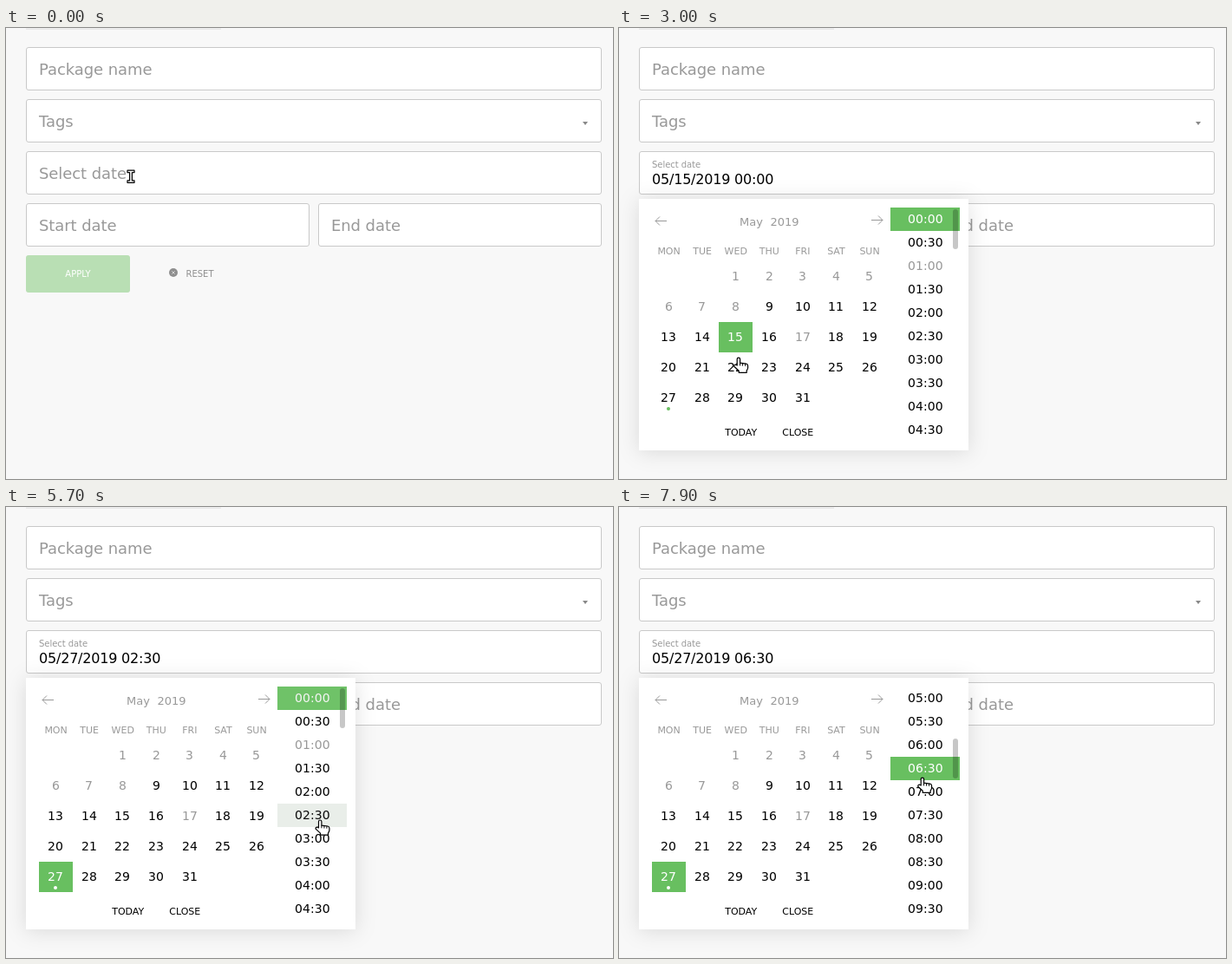
Recreate the animation shown at these times as an HTML page. Size 700x520 px, loop 8 s.

```html
<!DOCTYPE html>
<html lang="en">
<head>
<meta charset="utf-8">
<title>Date filter</title>
<style>
html, body { margin: 0; width: 100%; height: 100%; overflow: hidden; background: #f8f8f8; }
svg { display: block; width: 700px; height: 520px; font-family: "DejaVu Sans", sans-serif; }
.field rect { fill: #fff; stroke: #c9c9c9; }
.hint { font-size: 18px; letter-spacing: -.08px; fill: #999; }
.small { font-size: 10px; }
.mid { text-anchor: middle; }
.cells { font-size: 14px; letter-spacing: .09px; }
.line { fill: none; stroke: #999; }
#value { font-size: 16px; letter-spacing: -.2px; }
#popup { filter: drop-shadow(0 2px 12px rgba(0, 0, 0, .12)); }
#cursor path { fill: #fff; stroke: #000; stroke-width: 1.2; stroke-linejoin: round; }
</style>
</head>
<body>
<svg id="stage" viewBox="0 0 700 520" xmlns="http://www.w3.org/2000/svg">
  <defs><clipPath id="list"><rect x="313" y="207" width="80" height="270"/></clipPath></defs>
  <rect width="700" height="520" fill="#f8f8f8"/>
  <rect x="23" y="0.6" width="225" height="1" fill="#dedede"/>
  <g class="field">
    <rect x="23.5" y="22.5" width="663" height="49" rx="2.5"/>
    <rect x="23.5" y="82.5" width="663" height="49" rx="2.5"/>
    <rect id="dateBox" x="23.5" y="142.5" width="663" height="49" rx="2.5"/>
    <rect x="23.5" y="202.5" width="326" height="49" rx="2.5"/>
    <rect x="360.5" y="202.5" width="326" height="49" rx="2.5"/>
  </g>
  <g class="hint">
    <text x="38" y="54">Package name</text>
    <text x="38" y="114">Tags</text>
    <text id="label">Select date</text>
    <text x="38" y="234">Start date</text>
    <text x="375" y="234">End date</text>
  </g>
  <text id="value" x="38" y="180"></text>
  <path d="M665 108h6l-3 4z" fill="#888"/>
  <rect x="23" y="262" width="120" height="43" rx="3" fill="#b9dfb4"/>
  <text class="small mid" x="83" y="287" fill="#fff">APPLY</text>
  <circle cx="193" cy="282" r="5" fill="#8f8f8f"/>
  <path d="M191.3 280.3l3.4 3.4m0-3.4l-3.4 3.4" stroke="#d8d8d8" stroke-width=".9"/>
  <text class="small" x="207.5" y="287" fill="#8f8f8f">RESET</text>
  <g id="popup">
    <rect x="23" y="197" width="380" height="290" fill="#fff"/>
    <path class="line" d="M55 222.5H42m5-5l-5 5l5 5M291 221.5h13m-5-5l5 5l-5 5"/>
    <g font-size="13" fill="#999">
      <text x="139" y="228">May</text>
      <text x="174.5" y="228">2019</text>
    </g>
    <g id="names" class="mid" font-size="11" fill="#999"></g>
    <g id="days" class="cells"></g>
    <circle id="dot" cx="57" cy="439" r="2"/>
    <g class="mid" font-size="11">
      <text x="140.7" y="470">TODAY</text>
      <text x="206.3" y="470">CLOSE</text>
    </g>
    <g clip-path="url(#list)"><g id="times" class="cells"></g></g>
    <rect id="thumb" x="385" width="6" height="46" rx="3" fill-opacity=".22"/>
  </g>
  <g id="cursor">
    <g id="beam">
      <path d="M-4-6.8H4V-4.4H1.4V4.9H4V7.3H-4V4.9H-1.4V-4.4H-4Z"/>
    </g>
    <g id="arrow"><path d="M.5.5V17.2L4.2 13.7L6.8 20.2L9.6 19.1L6.9 12.7H12Z"/></g>
    <g id="hand">
      <path d="M-1.8 8V.8a1.7 1.7 0 0 1 3.4 0V5.2L8.6 6.1Q10.6 6.6 10.6 8.4V11Q10.2 13 9.2 14V16.3H.2V14.2L-5.2 9.2Q-5.4 7-3.2 7.2Z"/>
      <path d="M1.6 5V8.4M4.6 5.6V8.6M7.6 6V8.8" style="fill:none;stroke-width:1"/>
    </g>
  </g>
</svg>
<script>
const LOOP = 8000, TICK = 100, FADE = 300;
const WHITE = [255, 255, 255], BLACK = [0, 0, 0], GRAY = [153, 153, 153];
const HOVER = [240, 240, 240], GREEN = [104, 191, 96];
const BORDER = [201, 201, 201], BLUE = [60, 156, 220];
const COL = 270 / 7, ROW = 35, SLOT = 27;

// Moments of each user action
const OPEN = 760, PICK = 2560, REPICK = 4560, TIME_A = 5660, TIME_B = 7560;

// Pointer stops: time, x, y; the pointer eases from one to the next
const stops = [
  [0, 144, 171], [100, 142, 171], [1200, 142, 171], [1500, 140, 245], [1900, 212, 337],
  [2200, 164, 363], [2500, 140, 360], [2800, 140, 360], [3000, 138, 381], [3400, 96, 397],
  [3900, 168, 430], [4100, 149, 446], [4500, 58, 429], [5000, 389, 457], [5400, 363, 360],
  [6700, 358, 374], [6800, 354, 335], [7100, 328, 298], [7400, 350, 313], [LOOP, 350, 313]
];

const $ = id => document.getElementById(id);

function add(parent, tag, attrs, text) {
  const el = document.createElementNS("http://www.w3.org/2000/svg", tag);
  for (const k in attrs) el.setAttribute(k, attrs[k]);
  if (text) el.textContent = text;
  return parent.appendChild(el);
}

const blend = (a, b, k) => a.map((v, i) => v + (b[i] - v) * k);
const mix = (a, b, k) => `rgb(${blend(a, b, k).map(Math.round)})`;

function ramp(t, start, span = FADE) {
  const k = Math.min(1, Math.max(0, (t - start) / span));
  return k * k * (3 - 2 * k);
}

const colX = i => Math.round(38 + COL * i);

"MON TUE WED THU FRI SAT SUN".split(" ").forEach((name, i) =>
  add($("names"), "text", { x: 38.3 + COL * (i + .5), y: 261 }, name));

function makeCell(parent, x, y, width, height, textX, base, text, off) {
  const box = add(parent, "rect", { x, y, width, height, fill: "none" });
  const label = add(parent, "text", { x: textX, y: base }, text);
  return { box, label, off };
}

const days = [];
for (let d = 1; d <= 31; d++) {
  const col = (d + 1) % 7, x = colX(col), y = 269 + ROW * Math.floor((d + 1) / 7);
  const textX = Math.round(38 + COL * (col + .5) - 4.5 * String(d).length);
  days[d] = makeCell($("days"), x, y, colX(col + 1) - x, ROW, textX, y + 22, d, d < 9 || d === 17);
}

const times = Array.from({ length: 48 }, (_, i) => {
  const text = String(i >> 1).padStart(2, "0") + (i % 2 ? ":30" : ":00");
  const y = 207 + SLOT * i;
  return makeCell($("times"), 313, y, 80, SLOT, 333, y + 18, text, i === 2);
});

function paint(cell, picked, hovered) {
  const rest = hovered && !cell.off ? HOVER : WHITE;
  cell.box.setAttribute("fill", rest === WHITE && !picked ? "none" : mix(rest, GREEN, picked));
  cell.label.setAttribute("fill", mix(cell.off ? GRAY : BLACK, WHITE, picked));
}

function pointer(t) {
  const n = Math.max(1, stops.findIndex(p => p[0] >= t));
  const [a, b] = [stops[n - 1], stops[n]];
  return blend(a, b, ramp(t, a[0], b[0] - a[0])).slice(1);
}

const scrollAt = t => 270 * ramp(t, 5940, 720);

// What lies under the pointer at a given time
function target(t) {
  const [x, y] = pointer(t);
  if (y < 192) return { shape: "beam" };
  if (x >= 313 && x < 393 && y >= 207 && y < 477) {
    const slot = Math.floor((y - 207 + scrollAt(t)) / SLOT);
    return { slot, shape: times[slot].off ? "arrow" : "hand" };
  }
  if (x >= 38 && x < 308 && y >= 269 && y < 444) {
    const day = Math.floor((y - 269) / ROW) * 7 + Math.floor((x - 38) / COL) - 1;
    return { day, shape: days[day] && !days[day].off ? "hand" : "arrow" };
  }
  return { shape: "arrow" };
}

function draw(t) {
  const shown = ramp(t, OPEN), pick = ramp(t, PICK), again = ramp(t, REPICK);
  const early = ramp(t, TIME_A), late = ramp(t, TIME_B);

  $("dateBox").style.stroke = mix(BORDER, BLUE, shown - pick);
  $("label").setAttribute("transform",
    `translate(38 ${174 - 13 * pick}) scale(${1 - 8 / 18 * pick})`);
  const date = t < REPICK ? "05/15/2019" : "05/27/2019";
  const time = t < TIME_A ? "00:00" : t < TIME_B ? "02:30" : "06:30";
  $("value").textContent = t < PICK ? "" : `${date} ${time}`;

  $("popup").setAttribute("opacity", shown);
  $("popup").setAttribute("transform", `translate(0 ${-8 * (1 - shown)})`);

  // Hover follows the pointer one tick late
  const over = target(Math.max(0, t - TICK));
  const today = 1 - pick + again;
  const dayPick = { 15: pick - again, 27: today };
  days.forEach((cell, d) => paint(cell, dayPick[d] || 0, over.day === d));
  $("dot").setAttribute("fill", mix(GREEN, WHITE, today));

  const slotPick = { 0: 1 - early, 5: early - late, 13: late };
  times.forEach((cell, i) => paint(cell, slotPick[i] || 0, over.slot === i));
  const scroll = scrollAt(t);
  $("times").setAttribute("transform", `translate(0 ${-scroll})`);
  $("thumb").setAttribute("y", 209 + scroll * 58 / 270);

  const [x, y] = pointer(t), { shape } = target(t);
  $("cursor").setAttribute("transform", `translate(${x} ${y})`);
  for (const id of ["beam", "arrow", "hand"])
    $(id).setAttribute("display", id === shape ? "inline" : "none");
}

const began = performance.now();
function frame() {
  const t = (performance.now() - began) % LOOP;
  draw(Math.floor(t / TICK) * TICK);
  requestAnimationFrame(frame);
}
frame();
</script>
</body>
</html>
```
